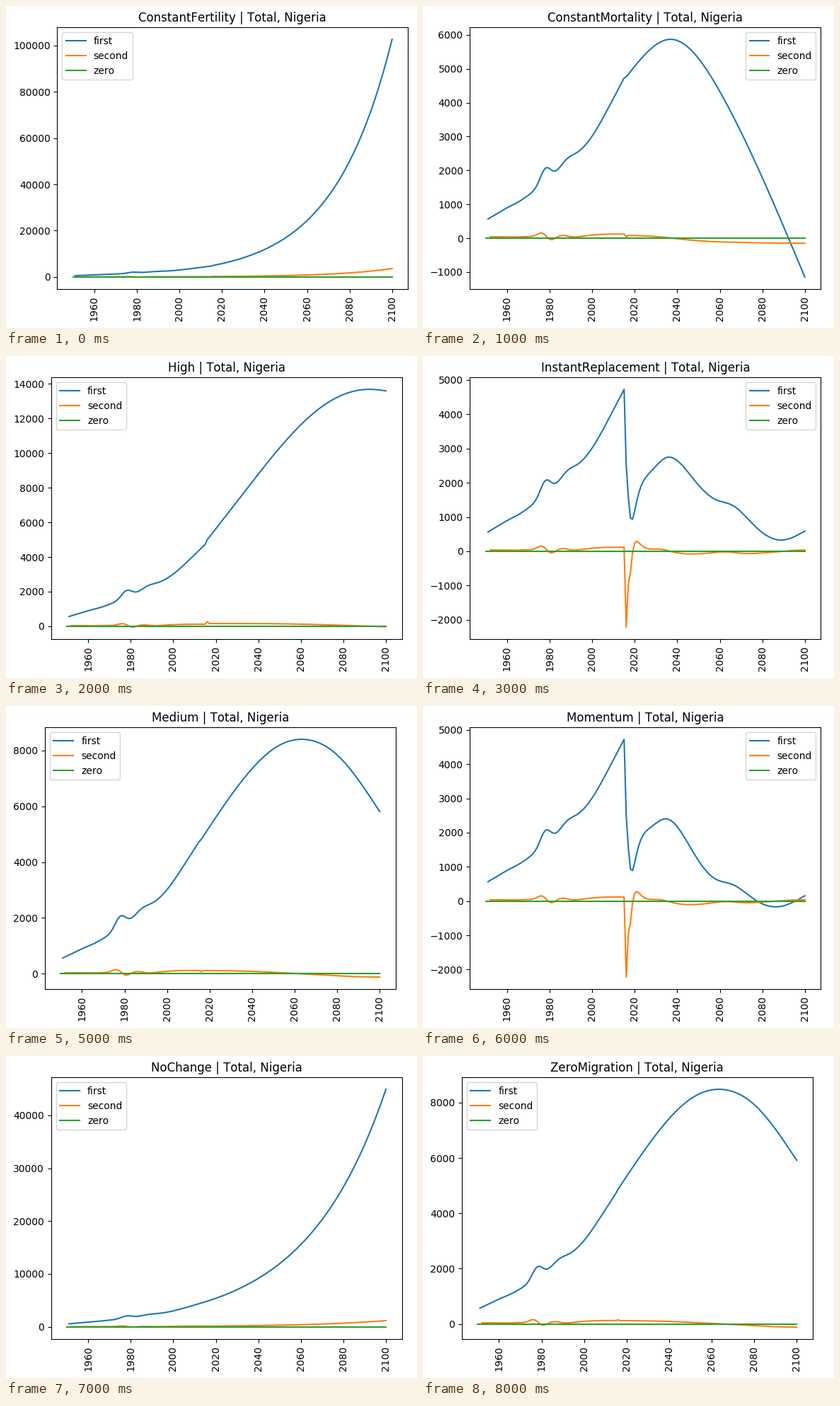
These frames come from a looping animation (581x455 px, 9000 ms). A matplotlib script:

```python
import matplotlib.pyplot as plt
import numpy as np
from matplotlib.animation import FuncAnimation

W, H, DPI = 581, 455, 100
AX_W, AX_H, AX_BOTTOM = 496, 369.6, 55.15
LABEL_LEFT, DIGIT_W, MINUS_W = 19.83, 8.75, 11.5

plt.rcParams["text.kerning_factor"] = 6


def curve(t, *points):
    """Natural cubic spline through (year, value) points, evaluated at t."""
    x, y = np.array(points, float).T
    h = np.diff(x)
    slope = np.diff(y) / h
    n = len(x)
    a, b = np.eye(n), np.zeros(n)
    for i in range(1, n - 1):
        a[i, i - 1:i + 2] = h[i - 1], 2 * (h[i - 1] + h[i]), h[i]
        b[i] = 6 * (slope[i] - slope[i - 1])
    m = np.linalg.solve(a, b)
    i = np.clip(np.searchsorted(x, t) - 1, 0, n - 2)
    l, r = x[i + 1] - t, t - x[i]
    return ((m[i] * l**3 + m[i + 1] * r**3) / (6 * h[i])
            + (y[i] / h[i] - m[i] * h[i] / 6) * l
            + (y[i + 1] / h[i] - m[i + 1] * h[i] / 6) * r)


# Yearly population growth in thousands: a steady rise with a bump near 1978
past_t = np.arange(1951, 2016)
past = curve(past_t, (1951, 565), (1955, 714), (1961, 930), (1966, 1095),
             (1971, 1306), (1983, 1928), (1988, 2335), (1993, 2533),
             (2000, 3015), (2008, 3890), (2015, 4725))
past += 460 * np.exp(-((past_t - 1978) / 2.5)**2 / 2)

t = np.arange(2016, 2101)
u = t - 2016

# Sudden fertility drop: growth collapses, then recovers within a decade
shock = (565 - 1470 * u**2) * np.exp(-0.82 * u)
replacement = shock + curve(t, (2016, 1950), (2028, 2366), (2035, 2738),
                            (2047, 2155), (2058, 1510), (2066, 1340),
                            (2077, 705), (2089, 328), (2100, 590))
momentum = replacement - curve(t, (2016, 10), (2028, 175), (2040, 475),
                               (2053, 810), (2068, 835), (2090, 470), (2100, 435))
zero_migration = curve(t, (2016, 4870), (2035, 6960), (2050, 8130),
                       (2066, 8470), (2080, 7930), (2100, 5915))

variants = {
    "ConstantFertility": 5000 * np.exp(0.03598 * u),
    "ConstantMortality": curve(t, (2016, 4760), (2037, 5870), (2060, 4330),
                               (2100, -1150)),
    "High": curve(t, (2016, 4995), (2032, 7520), (2050, 10300), (2070, 12690),
                  (2093, 13680), (2100, 13590)),
    "InstantReplacement": replacement,
    "Low": curve(t, (2016, 4620), (2020, 4760), (2030, 5370), (2043, 6073),
                 (2060, 5485), (2075, 4155), (2100, 780)),
    "Medium": zero_migration - 65 - u / 2,
    "Momentum": momentum,
    "NoChange": 4850 * np.exp(0.0265 * u),
    "ZeroMigration": zero_migration,
}
names = list(variants)

fig = plt.figure(figsize=(W / DPI, H / DPI), dpi=DPI)
ax = fig.add_axes([0, AX_BOTTOM / H, AX_W / W, AX_H / H])


def label_width(value):
    return sum(MINUS_W if c == "-" else DIGIT_W for c in f"{value:.0f}")


def draw(i):
    name = names[i]
    first = np.concatenate([past, variants[name]])
    ax.clear()
    ax.plot(np.arange(1951, 2101), first, label="first")
    ax.plot(np.arange(1952, 2101), np.diff(first), label="second")
    ax.plot(np.arange(1950, 2101), np.zeros(151), label="zero")
    ax.set_title(f"{name} | Total, Nigeria")
    ax.set_xticks(range(1960, 2101, 20))
    ax.tick_params(axis="x", rotation=90)
    ax.legend(loc="best")

    # The axes start right after the widest visible tick label
    low, high = ax.get_ylim()
    left = LABEL_LEFT + max(label_width(v) for v in ax.get_yticks()
                            if low <= v <= high)
    ax.set_position([left / W, AX_BOTTOM / H, AX_W / W, AX_H / H])
    return ax.lines


anim = FuncAnimation(fig, draw, frames=len(names), init_func=lambda: [],
                     interval=1000, repeat=True, repeat_delay=0)
plt.show()
```
